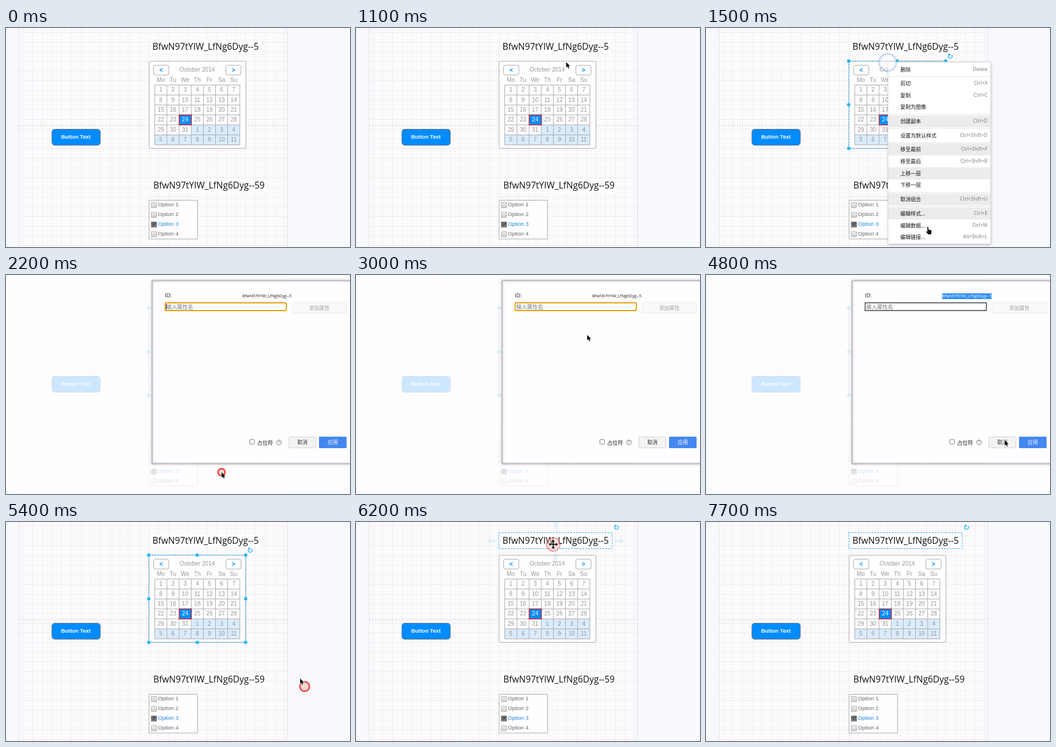
An HTML page with a canvas that plays this animation: 600x382 px, repeating every 8 s.

```html
<!DOCTYPE html>
<html lang="zh">
<head>
<meta charset="utf-8">
<title>Shape IDs</title>
<style>
html, body { margin: 0; width: 100%; height: 100%; overflow: hidden; background: #f8f9fc; }
canvas { display: block; width: 600px; height: 382px; }
</style>
</head>
<body>
<canvas id="stage"></canvas>
<script>
const W = 600, H = 382, LOOP = 8000, STEP = 100;
const canvas = document.getElementById('stage');
const dpr = window.devicePixelRatio || 1;
canvas.width = W * dpr;
canvas.height = H * dpr;
const c = canvas.getContext('2d');

const ARIAL = '"Liberation Sans", Arial, sans-serif';
const UI = '"Open Sans", "Noto Sans", sans-serif';
const CJK = '"Noto Sans CJK SC", "Noto Sans CJK", sans-serif';
const BLUE = '#008cff', SELECT = '#29b6f2', EDGE = '#a8a8ac';
const ID = 'BfwN97tYIW_LfNg6Dyg--5';

const MENU_AT = 1300, DIALOG_AT = 2200, BLUR_AT = 3600, CLOSE_AT = 5300, PICK_AT = 6000;

// Pointer path: time, x, y
const PATH = [
  [100, 569, 1], [300, 416, 59], [1000, 416, 59], [1200, 317, 60], [1300, 328, 105],
  [1500, 387, 347], [1900, 376, 344], [2300, 376, 344], [3200, 411, 36], [3500, 411, 36],
  [3800, 511, 36], [4300, 511, 36], [4800, 521, 288], [5200, 521, 287], [5400, 513, 273],
  [5800, 410, 170], [6100, 344, 39], [6300, 344, 39], [6700, 306, 113], [7000, 85, 344]
];
const CLICKS = [[2100, 376, 344], [3500, 411, 35], [5230, 521, 287], [5920, 344, 39]];

// Context menu: centre y, label, shortcut, trail of the passing highlight
const MENU = [
  [72.5, '删除', 'Delete'], [97, '剪切', 'Ctrl+X'], [117.5, '复制', 'Ctrl+C'],
  [138, '复制为图像', ''], [163, '创建副本', 'Ctrl+D', 1], [187.5, '设置为默认样式', 'Ctrl+Shift+D'],
  [212, '移至最前', 'Ctrl+Shift+F', 1], [233, '移至最后', 'Ctrl+Shift+B'], [253.5, '上移一层', '', 1],
  [274, '下移一层', ''], [299, '取消组合', 'Ctrl+Shift+U', 1], [323.5, '编辑样式...', 'Ctrl+E', 1],
  [344.5, '编辑数据...', 'Ctrl+M'], [365, '编辑链接...', 'Alt+Shift+L']
];
const RULES = [84.5, 150.5, 175.5, 200.5, 286.5, 311.5];

const clamp = (v, a, b) => Math.min(b, Math.max(a, v));

function text(s, x, y, size, color, family = ARIAL, align = 'left', weight = '') {
  c.font = `${weight} ${size}px ${family}`;
  c.fillStyle = color;
  c.textAlign = align;
  c.textBaseline = 'middle';
  c.fillText(s, x, y);
}

function box(x, y, w, h, fill, stroke, r = 0, lw = 1) {
  c.beginPath();
  c.roundRect(x, y, w, h, r);
  if (fill) { c.fillStyle = fill; c.fill(); }
  if (stroke) { c.strokeStyle = stroke; c.lineWidth = lw; c.stroke(); }
}

function line(x1, y1, x2, y2, color, lw = 1) {
  c.beginPath();
  c.moveTo(x1, y1);
  c.lineTo(x2, y2);
  c.strokeStyle = color;
  c.lineWidth = lw;
  c.stroke();
}

function poly(points, fill, stroke, lw = 1) {
  c.beginPath();
  points.forEach(([x, y]) => c.lineTo(x, y));
  c.closePath();
  if (stroke) { c.strokeStyle = stroke; c.lineWidth = lw; c.stroke(); }
  c.fillStyle = fill;
  c.fill();
}

function disc(x, y, r, fill) {
  c.beginPath();
  c.arc(x, y, r, 0, Math.PI * 2);
  c.fillStyle = fill;
  c.fill();
}

function grid(start, from, to, draw) {
  const cell = 4.225;
  for (let k = Math.ceil((from - start) / cell); start + k * cell < to; k++) {
    draw(start + k * cell, k % 4 === 0 ? '#ece9ee' : '#f8f6f9');
  }
}

function page() {
  c.fillStyle = '#f8f9fc';
  c.fillRect(0, 0, W, H);
  c.fillStyle = '#fffdff';
  c.fillRect(23, 0, 468, H);
  c.globalCompositeOperation = 'darken';
  grid(249.5, 23, 491, (x, color) => line(x, 0, x, H, color));
  grid(58.2, 0, H, (y, color) => line(23, y, 491, y, color));
  c.globalCompositeOperation = 'source-over';
  line(23, 0, 23, H, '#e2e2e6');
  line(491, 0, 491, H, '#e2e2e6');
  c.setLineDash([3, 2]);
  line(23, 170, 491, 170, '#d2d0d4');
  c.setLineDash([]);
}

function calendar() {
  box(249.5, 58, 169, 152, '#fffdff', EDGE, 3);
  [['<', 257.5], ['>', 383.5]].forEach(([s, x]) => {
    box(x, 65, 26.5, 17, '#fff', EDGE, 3);
    text(s, x + 13.2, 73.5, 11, BLUE, ARIAL, 'center', 'bold');
  });
  text('October 2014', 333.5, 73.5, 10.14, '#999', ARIAL, 'center');
  const x0 = 259.5, y0 = 99.5, cw = 21.2, ch = 17.4;
  ['Mo', 'Tu', 'We', 'Th', 'Fr', 'Sa', 'Su'].forEach((d, i) =>
    text(d, x0 + cw * (i + 0.5), 91, 10.14, '#999', ARIAL, 'center'));
  box(x0, y0, cw * 7, ch * 6, '#fff');
  box(x0 + cw * 3, y0 + ch * 4, cw * 4, ch, '#daecfb');
  box(x0, y0 + ch * 5, cw * 7, ch, '#daecfb');
  for (let i = 0; i <= 7; i++) line(x0 + i * cw, y0, x0 + i * cw, y0 + ch * 6, EDGE);
  for (let i = 0; i <= 6; i++) line(x0, y0 + i * ch, x0 + cw * 7, y0 + i * ch, EDGE);
  for (let i = 0; i < 42; i++) {
    const x = x0 + (i % 7) * cw, y = y0 + Math.floor(i / 7) * ch, today = i === 23;
    if (today) box(x + 0.3, y - 0.1, cw, ch, BLUE, '#c22c3c', 0, 1.5);
    text(i % 31 + 1, x + cw / 2, y + ch / 2 + 0.3, 10.14, today ? '#fff' : '#949498', ARIAL, 'center');
  }
}

function options() {
  box(249.5, 300.5, 84.5, 67.5, '#fffdff', EDGE);
  for (let i = 0; i < 4; i++) {
    const y = 308.5 + i * 16.9, on = i === 2;
    const g = c.createLinearGradient(0, y - 4.5, 0, y + 4.5);
    g.addColorStop(0, on ? '#5c5c60' : '#f2f2f2');
    g.addColorStop(1, on ? '#808084' : '#cfcfd1');
    box(253.5, y - 4, 9, 9, g, on ? '#707074' : '#b2b2b6');
    if (on) {
      line(255.5, y + 0.8, 257.3, y + 2.8, '#39393c');
      line(257.3, y + 2.8, 261, y - 2, '#39393c');
    }
    text('Option ' + (i + 1), 265, y, 9.5, on ? '#1388e0' : '#66666a');
  }
}

function title(s, x, y, w) {
  c.fillStyle = '#fffdff';
  c.fillRect(x - 2, y - 11, w, 22);
  text(s, x, y + 0.6, 15.5, '#111', UI);
}

function rotateIcon(x, y) {
  c.beginPath();
  c.arc(x, y, 3.4, -0.9, Math.PI * 1.35);
  c.strokeStyle = SELECT;
  c.lineWidth = 1.4;
  c.stroke();
  poly([[x - 4, y - 4.6], [x + 0.4, y - 4.6], [x - 1.2, y - 0.6]], SELECT);
}

function outline(x, y, w, h) {
  c.setLineDash([3, 2]);
  box(x, y, w, h, null, SELECT);
  c.setLineDash([]);
}

function calendarSelection() {
  outline(249, 57.5, 169, 152.5);
  for (let i = 0; i < 9; i++) {
    if (i !== 4) disc(249 + (i % 3) * 84.5, 57.7 + Math.floor(i / 3) * 76.2, 3, SELECT);
  }
  rotateIcon(426, 49.5);
}

function hintArrows() {
  [[236, 33, Math.PI], [459, 33, 0], [348, 6, -Math.PI / 2], [348, 61, Math.PI / 2]].forEach(([x, y, a]) => {
    c.save();
    c.translate(x, y);
    c.rotate(a);
    poly([[-7, -2], [1, -2], [1, -5], [8, 0], [1, 5], [1, 2], [-7, 2]], 'rgba(41,182,242,.14)');
    c.restore();
  });
}

function menu(t) {
  c.save();
  c.shadowColor = 'rgba(0,0,0,.3)';
  c.shadowBlur = 5 * dpr;
  c.shadowOffsetY = dpr;
  box(317.5, 59.5, 179, 317, '#fff');
  c.restore();
  box(317.5, 59.5, 179, 317, null, '#d9d9dc');
  const [, my] = pointer(t);
  MENU.forEach(([y, label, keys, trail]) => {
    const hot = t >= 1600 ? y === 344.5 : trail && y < my - 8;
    if (hot) box(318, y - 10.5, 178, 21, '#ececee');
    text(label, 339, y, 9, '#111', CJK);
    text(keys, 491, y, 8.5, '#77777b', UI, 'right');
  });
  RULES.forEach(y => line(318, y, 496, y, '#e4e4e7'));
}

function dialog(t) {
  c.fillStyle = 'rgba(255,254,255,.8)';
  c.fillRect(0, 0, W, H);
  c.save();
  c.shadowColor = 'rgba(0,0,0,.25)';
  c.shadowBlur = 4 * dpr;
  box(255, 10, 360, 319, '#fffdff', '#b4b4b8', 0, 1.6);
  c.restore();
  text('ID:', 277, 37, 9.5, '#222', UI);
  text(ID, 412, 37, 7.2, '#222', UI);
  if (t >= BLUR_AT) {
    const w = clamp(pointer(t)[0] - 412, 0, 86);
    c.save();
    c.beginPath();
    c.rect(412, 32, w, 10);
    c.clip();
    c.fillStyle = '#2b8cf0';
    c.fillRect(412, 32, w, 10);
    text(ID, 412, 37, 7.2, '#fff', UI);
    c.restore();
  }
  const focus = t < BLUR_AT;
  box(277.5, 48.5, 211.5, 13.5, '#fff', focus ? '#e69a00' : '#3a3a3a', focus ? 2 : 0, focus ? 1.8 : 1.4);
  text('输入属性名', 279.5, 55.3, 9.4, '#757579', CJK);
  if (focus && Math.floor((t - DIALOG_AT) / 500) % 2 === 0) line(279.5, 50.5, 279.5, 60.5, '#111');
  box(499, 48, 95, 18.5, '#f9f8fa', '#ebebed');
  text('添加属性', 546.5, 57.3, 9, '#a2a2a6', CJK, 'center');
  box(425.3, 287, 8, 8, '#fff', '#767676', 1.5);
  text('占位符', 438, 292, 9.3, '#222', CJK);
  c.beginPath();
  c.arc(476, 292, 4.2, 0, Math.PI * 2);
  c.strokeStyle = '#66666a';
  c.lineWidth = 0.9;
  c.stroke();
  text('?', 476, 292.2, 7, '#66666a', ARIAL, 'center');
  box(493.5, 282.5, 47, 19, '#f3f3f4', '#d2d2d5', 1);
  text('取消', 517, 292, 9, '#333', CJK, 'center');
  box(546, 282, 48, 20, '#4387f1', null, 1);
  text('应用', 570, 292, 9, '#fff', CJK, 'center');
}

function pointer(t) {
  const i = PATH.findIndex(p => p[0] > t);
  if (i < 0) return PATH[PATH.length - 1].slice(1);
  if (i === 0) return PATH[0].slice(1);
  const [t0, x0, y0] = PATH[i - 1], [t1, x1, y1] = PATH[i];
  const k = (t - t0) / (t1 - t0);
  return [x0 + (x1 - x0) * k, y0 + (y1 - y0) * k];
}

function ripples(t) {
  if (t >= 1200 && t < 1900) {
    const age = t - 1200;
    c.globalAlpha = clamp((1900 - t) / 400, 0, 1);
    c.beginPath();
    c.arc(317, 60, Math.min(15, 5 + age / 30), 0, Math.PI * 2);
    c.fillStyle = 'rgba(250,252,255,.55)';
    c.fill();
    c.strokeStyle = 'rgba(125,160,225,.38)';
    c.lineWidth = 3;
    c.stroke();
    c.globalAlpha = 1;
  }
  CLICKS.forEach(([at, x, y]) => {
    const age = t - at;
    if (age < 90 || age > 480) return;
    c.globalAlpha = clamp(1 - (age - 180) / 300, 0, 1);
    c.beginPath();
    c.arc(x, y, 3 + age / 32, 0, Math.PI * 2);
    c.fillStyle = 'rgba(255,190,190,.6)';
    c.fill();
    c.strokeStyle = '#f0433f';
    c.lineWidth = 2.6;
    if (age > 250) c.setLineDash([1.5, 1]);
    c.stroke();
    c.setLineDash([]);
    c.globalAlpha = 1;
  });
}

function cursor(t) {
  if (t < 100 || t >= 7000) return;
  const [x, y] = pointer(t);
  c.save();
  c.translate(x, y);
  c.lineJoin = 'round';
  if (t >= MENU_AT && t < DIALOG_AT) {
    poly([[-1.2, 0], [0.5, 0], [1, 4.5], [5.5, 5.5], [6.5, 7.5], [5.5, 13], [0.5, 13],
      [-3, 8.5], [-2.5, 7.2], [-0.6, 8.4]], '#111', '#fff', 1.6);
  } else if (t >= PICK_AT && t < 6700) {
    for (let i = 0; i < 4; i++) {
      line(0, 0, 6, 0, '#111', 1.7);
      poly([[4.5, -3], [8, 0], [4.5, 3]], '#111');
      c.rotate(Math.PI / 2);
    }
  } else {
    poly([[0, 0], [0, 9.5], [2.2, 7.6], [3.8, 11], [5.4, 10.2], [3.9, 7], [6.8, 6.8]], '#0a0a0a', '#fff', 1.2);
  }
  c.restore();
}

function draw(t) {
  c.setTransform(dpr, 0, 0, dpr, 0, 0);
  page();
  title(ID, 255.5, 33.5, 190);
  title(ID + '9', 257, 275.5, 198);
  calendar();
  options();
  box(80, 176.5, 84.5, 28, BLUE, '#6a7480', 5);
  text('Button Text', 122, 190, 9.4, '#fff', ARIAL, 'center', 'bold');
  if (t >= 1200 && t < PICK_AT) calendarSelection();
  if (t >= PICK_AT) {
    outline(249, 18.5, 198, 28);
    rotateIcon(454.5, 9.5);
    if (t >= 6100 && t < 6600) hintArrows();
  }
  if (t >= MENU_AT && t < DIALOG_AT) menu(t);
  if (t >= DIALOG_AT && t < CLOSE_AT) dialog(t);
  ripples(t);
  cursor(t);
}

function frame() {
  const t = performance.now() % LOOP;
  draw(Math.floor(t / STEP) * STEP);
  requestAnimationFrame(frame);
}
frame();
</script>
</body>
</html>
```
